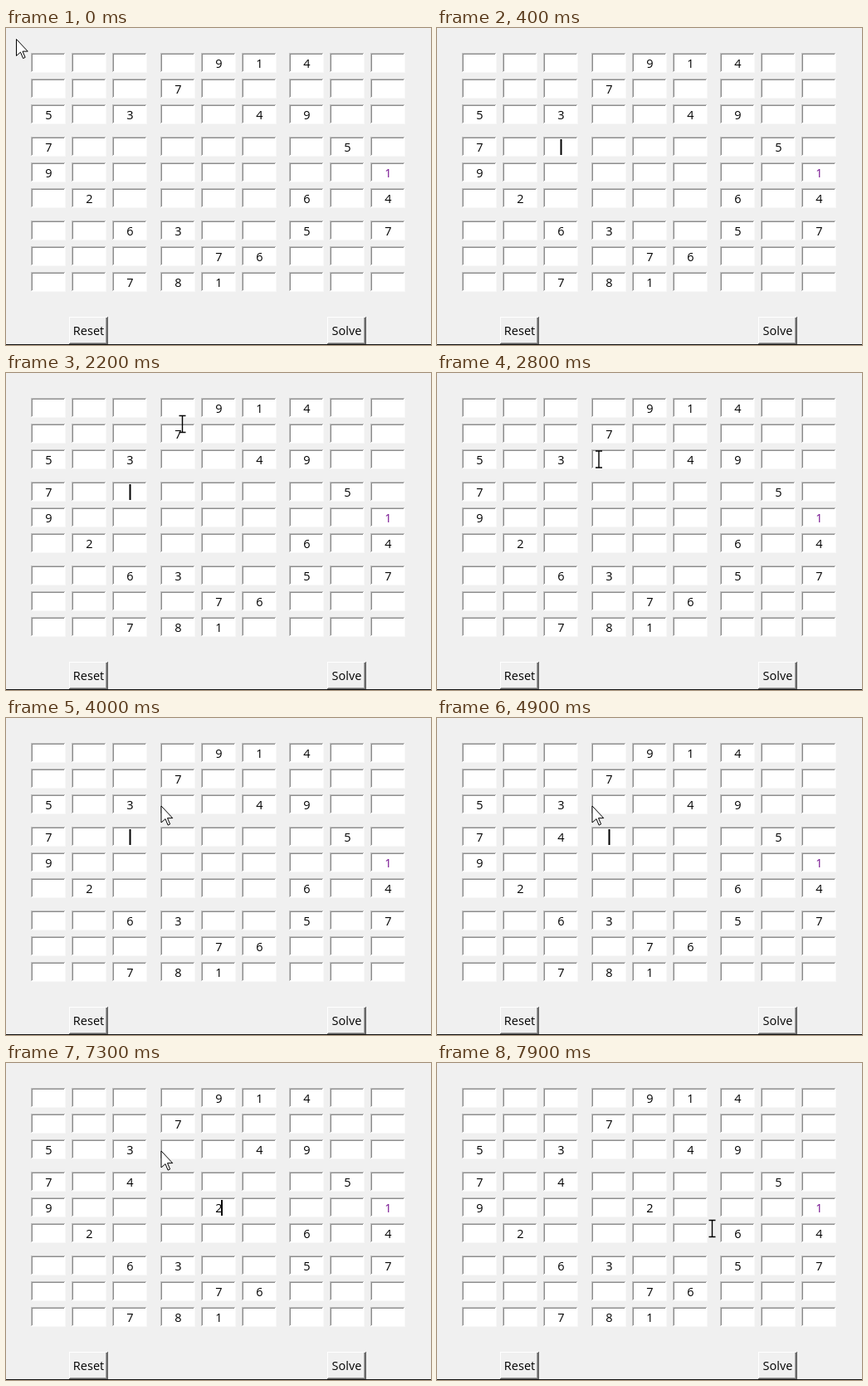
Write an HTML page with a canvas that moves like this. It is 512 px wide and 382 px high and loops after 8000 ms.

```html
<!DOCTYPE html>
<html lang="en">
<head>
<meta charset="utf-8">
<title>Sudoku</title>
<style>
  html, body { margin: 0; width: 100%; height: 100%; overflow: hidden; background: #f0f0f0; }
  canvas { display: block; }
</style>
</head>
<body>
<canvas id="stage" width="512" height="382"></canvas>
<script>
const ctx = document.getElementById('stage').getContext('2d');
const LOOP = 8000, STEP = 100;

const board = [
  '....914..',
  '...7.....',
  '5.3..49..',
  '7......5.',
  '9.......1',
  '.2....6.4',
  '..63..5.7',
  '....76...',
  '..781....'
];

// Cells that take the focus, and what is typed there
const focusSteps = [
  { from: 400, row: 3, col: 2, digit: '4', typedAt: 4500 },
  { from: 4900, row: 3, col: 3 },
  { from: 5200, row: 3, col: 4 },
  { from: 5400, row: 4, col: 4, digit: '2', typedAt: 6900 }
];

// Each pointer glides through evenly timed points
const pointers = [
  { shape: arrow, from: 0, to: 300, points: [[12.5, 13.5], [449, 284]] },
  { shape: beam, from: 2000, to: 2300, points: [[212.5, 61.5]] },
  { shape: beam, from: 2400, to: 2800, points: [[214, 64], [219, 78], [195, 104]] },
  { shape: arrow, from: 2900, to: 7300, points: [[187, 106]] },
  { shape: arrow, from: 3400, to: 3600, points: [[190, 110], [391, 346]] },
  { shape: beam, from: 7400, to: 7900, points: [[120, 99], [53, 92], [331.5, 199.5]] }
];

const cellX = col => Math.round(30 + 49 * col + 8.6 * Math.floor(col / 3));
const cellY = row => 30 + 31 * row + 8 * Math.floor(row / 3);

function rect(color, x, y, w, h) {
  ctx.fillStyle = color;
  ctx.fillRect(x, y, w, h);
}

function label(text, x, y, color = '#000') {
  ctx.fillStyle = color;
  ctx.fillText(text, x, y);
}

// Top and left edges of a bevelled box
function corner(color, x, y, w, h) {
  rect(color, x, y, w, 1);
  rect(color, x, y, 1, h);
}

function digitAt(row, col, t) {
  const step = focusSteps.find(s => s.row === row && s.col === col && t >= s.typedAt);
  return step ? step.digit : board[row][col];
}

function drawCell(row, col, t) {
  const x = cellX(col), y = cellY(row);
  rect('#f8f8f8', x, y, 42, 24);
  rect('#fff', x, y, 41, 23);
  corner('#c0c0c0', x, y, 41, 23);
  corner('#8c8c8c', x + 1, y + 1, 39, 21);
  const digit = digitAt(row, col, t);
  if (digit !== '.') label(digit, x + 21.5, y + 18, row === 4 && col === 8 ? '#75108f' : '#000');
}

function drawButton(text, x) {
  rect('#696969', x, 348, 47, 33);
  rect('#a0a0a0', x, 348, 45, 32);
  rect('#f0f0f0', x, 348, 44, 31);
  corner('#fff', x, 348, 46, 32);
  label(text, x + 23.5, 370);
}

function drawCaret(t) {
  const focus = focusSteps.findLast(s => t >= s.from);
  const blinkStart = t < 5400 ? 400 : 5500;
  if (!focus || (t - blinkStart) % 900 >= 600) return;
  const filled = digitAt(focus.row, focus.col, t) !== '.';
  rect('#000', cellX(focus.col) + (filled ? 24 : 20.5), cellY(focus.row) + 3, 2, 19);
}

function arrow(x, y) {
  const outline = [[0, 0], [0, 16], [4, 12.5], [6.5, 18.5], [8.5, 17.5], [6, 11.7], [11, 11.7]];
  ctx.beginPath();
  for (const [dx, dy] of outline) ctx.lineTo(x + dx * 1.25, y + dy * 1.25);
  ctx.closePath();
  ctx.fillStyle = '#fff';
  ctx.fill();
  ctx.lineWidth = 1;
  ctx.stroke();
}

function beam(x, y) {
  ctx.beginPath();
  ctx.moveTo(x, y - 10);
  ctx.lineTo(x, y + 10);
  for (const end of [y - 10, y + 10]) {
    ctx.moveTo(x - 4, end);
    ctx.lineTo(x + 4, end);
  }
  ctx.lineWidth = 1.4;
  ctx.stroke();
}

function drawPointer({ shape, from, to, points }, t) {
  if (t < from || t > to) return;
  const along = (t - from) / (to - from) * (points.length - 1);
  const i = Math.floor(along), a = points[i], b = points[i + 1] || a;
  shape(...a.map((v, axis) => v + (b[axis] - v) * (along - i)));
}

function draw(t) {
  rect('#f0f0f0', 0, 0, 512, 382);
  ctx.font = '500 14.5px "Open Sans", "Noto Sans", sans-serif';
  ctx.textAlign = 'center';
  ctx.strokeStyle = '#000';
  for (let row = 0; row < 9; row++)
    for (let col = 0; col < 9; col++) drawCell(row, col, t);
  drawButton('Reset', 76);
  drawButton('Solve', 387);
  rect('#111', 0, 381, 512, 1);
  drawCaret(t);
  for (const pointer of pointers) drawPointer(pointer, t);
}

const start = performance.now();
function tick() {
  const t = (performance.now() - start) % LOOP;
  draw(Math.floor(t / STEP) * STEP);
  requestAnimationFrame(tick);
}
tick();
</script>
</body>
</html>
```
